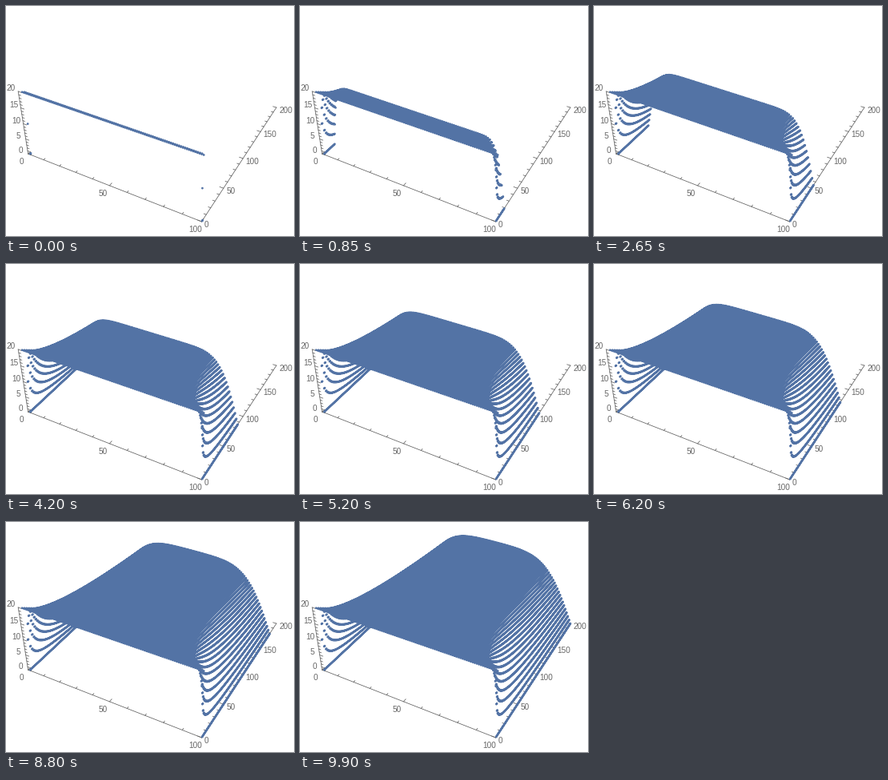
A matplotlib script for the animation above (9950 ms loop, 360 by 288 pixels).

```python
import numpy as np
import matplotlib.pyplot as plt
from matplotlib.animation import FuncAnimation
from matplotlib.patches import PathPatch
from matplotlib.path import Path

W, H = 360, 288
NX, NT = 100, 200
BLUE, GRAY = "#5373a5", "#666666"
DOT = 1.42          # dot radius in pixels
SIDES = 10

# Perspective camera looking at the centre of a 1 x 1 x 0.4 box
EYE = np.array([1.3, -2.4, 2.0])
DIST = np.linalg.norm(EYE)
FORWARD = EYE / DIST
RIGHT = np.cross([0, 0, 1], FORWARD)
RIGHT /= np.linalg.norm(RIGHT)
UP = np.cross(FORWARD, RIGHT)
SCALE, CX, CY = 800, 190.0, 117.85


def project(x, y, z):
    """Data coordinates to stage pixels."""
    box = np.stack(np.broadcast_arrays(
        x / 100 - 0.5, y / 200 - 0.5, z / 50 - 0.2), axis=-1)
    depth = DIST - box @ FORWARD
    return np.stack([CX + SCALE * (box @ RIGHT) / depth,
                     CY - SCALE * (box @ UP) / depth], axis=-1)


def diffuse():
    """Cooling rod with both ends held at zero, one row per time step."""
    u = np.zeros((NT, NX))
    u[0, 1:-1] = 20
    for n in range(NT - 1):
        u[n + 1, 1:-1] = (u[n, :-2] + u[n, 2:]) / 2
    return u


def dot_outlines(centres):
    """One closed polygon per dot, as flat vertices and codes."""
    a = np.linspace(0, 2 * np.pi, SIDES + 1)
    ring = DOT * np.column_stack([np.cos(a), np.sin(a)])
    verts = (centres[:, None, :] + ring).reshape(-1, 2)
    codes = np.full(SIDES + 1, Path.LINETO, dtype=np.uint8)
    codes[0], codes[-1] = Path.MOVETO, Path.CLOSEPOLY
    return verts, np.tile(codes, len(centres))


fig = plt.figure(figsize=(W / 72, H / 72), dpi=72, facecolor="white")
ax = fig.add_axes([0, 0, 1, 1])
ax.axis("off")


def segment(p, q):
    a, b = project(*p), project(*q)
    ax.plot([a[0], b[0]], [a[1], b[1]], color=GRAY, lw=0.8, zorder=1)


def draw_axis(place, inward, end, step, major, shift, align):
    """Axis line, ticks pointing along inward, and labels at major steps."""
    segment(place(0), place(end))
    for v in range(0, end + 1, step):
        p = np.array(place(v), float)
        size = 0.02 if v % major == 0 else 0.012
        segment(p, p + size * np.array(inward))
        if v % major == 0:
            x, y = project(*p) + shift
            ax.text(x, y + 3.6, str(v), ha=align, va="baseline", color=GRAY,
                    family="Liberation Sans", fontsize=10, zorder=1)


draw_axis(lambda v: (v, 0, 0), (0, 200, 0), 100, 10, 50, (-8, 9.3), "center")
draw_axis(lambda v: (100, v, 0), (-100, 0, 0), 200, 10, 50, (3.5, 3.3), "left")
draw_axis(lambda v: (0, 0, v), (100, 0, 0), 20, 1, 5, (-9, -4.3), "center")

cols = np.arange(1, NX + 1)[None, :]
rows = np.arange(1, NT + 1)[:, None]
verts, codes = dot_outlines(project(cols, rows, diffuse()).reshape(-1, 2))
PER_ROW = NX * (SIDES + 1)


def dots(n_rows):
    n = n_rows * PER_ROW
    return Path(verts[:n], codes[:n])


cloud = PathPatch(dots(2), facecolor=BLUE, edgecolor="none", lw=0,
                  snap=False, zorder=2)
ax.add_patch(cloud)
ax.set_xlim(0, W)
ax.set_ylim(H, 0)


def update(i):
    cloud.set_path(dots(i + 2))
    return [cloud]


anim = FuncAnimation(fig, update, frames=NT - 1, interval=50,
                     repeat=True, repeat_delay=0)
plt.show()
```
